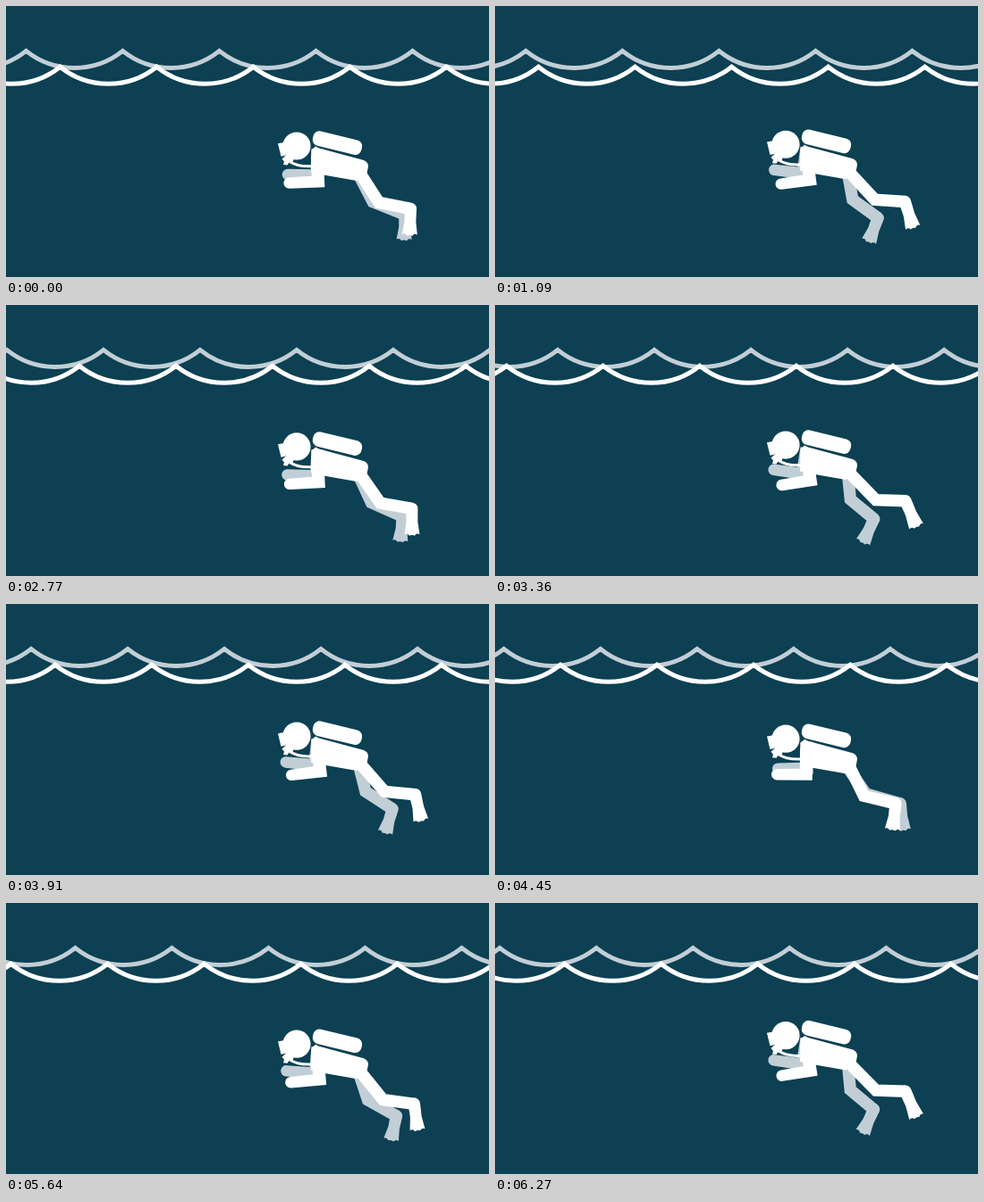
An HTML page that plays this animation: 540x304 px, repeating every 6.31 s.

```html
<!DOCTYPE html>
<html lang="en">
<head>
<meta charset="utf-8">
<title>Scuba diver</title>
<style>
  html, body { margin: 0; width: 100%; height: 100%; overflow: hidden; background: #0c4052; }
  svg { display: block; width: 100vw; height: 100vh; }
  .near { fill: #fff; stroke: #fff; }
  .far { fill: #c2ced6; stroke: #c2ced6; }
  .flat { stroke: none; }
  .line { fill: none; }
  .wave { stroke-width: 5; stroke-miterlimit: 6; }
  .leg { stroke-width: 13.4; }
</style>
</head>
<body>
<svg viewBox="0 0 540 304">
  <path id="waveFar" class="far wave line"/>
  <path id="waveNear" class="near wave line"/>
  <circle id="bubble" class="near line" r="4" stroke-width="2"/>
  <g id="diver">
    <g id="armFar" class="far flat"><path class="arm"/></g>
    <g class="far">
      <path id="legFar" class="leg line"/>
      <path id="footFar" class="flat"/>
    </g>
    <g class="near">
      <path id="legNear" class="leg line"/>
      <path id="footNear" class="flat"/>
    </g>
    <g class="near flat">
      <rect x="342.5" y="135.7" width="56" height="16.8" rx="7" transform="rotate(13.7 370.5 144)"/>
      <path d="M341.5 152L346 148L350 150L400 163.5Q405 165.5 405 170.5L403.5 178L392 186.5L355 180L341 177Z"/>
      <circle cx="325" cy="147.5" r="15.6"/>
      <path d="M304 144.7L310.5 143.5L313 158L307.5 159.2Z"/>
      <path d="M308.5 162L314 157L322 161L320.5 166L316.5 166L314.5 169L310 168.5L311 165Z"/>
    </g>
    <path class="near line" stroke-width="3" d="M317 165Q327 171.5 344 170"/>
    <g id="armNear" class="near flat"><path class="arm"/></g>
  </g>
</svg>
<script>
const LOOP = 6310, STEP = LOOP / 139, SPAN = 108;
const $ = id => document.getElementById(id);
const set = (id, name, value) => $(id).setAttribute(name, value);
const turn = (t, peak, period) => 2 * Math.PI * (t - peak) / period;
const clamp = x => Math.max(0, Math.min(1, x));

const ARM = "M341 158H355V194H315.5A6.25 6.25 0 0 1 315.5 181.5L341 181Z";
document.querySelectorAll(".arm").forEach(p => p.setAttribute("d", ARM));

const wave = y => `M${-3 * SPAN} ${y}` + `a86 86 0 0 0 ${SPAN} 0`.repeat(10);
set("waveFar", "d", wave(50.4));
set("waveNear", "d", wave(68.2));

// Each joint: start, end, bulge halfway
const LEGS = {
  Near: {
    hip: [396.5, 179],
    knee: [[408, 212], [426, 209], [2, 0]],
    ankle: [[443.5, 222], [459, 210], [3, 0.5]],
    tip: [[438.5, 250.5], [471.5, 238.5], [0, 1]]
  },
  Far: {
    hip: [394.5, 180],
    knee: [[418.5, 208], [397, 208.5], [0, 2]],
    ankle: [[459, 216], [423, 230.5], [1, 3]],
    tip: [[465.5, 246.5], [410.5, 256.5], [1, 2]]
  }
};

const joint = ([from, to, bulge], u) =>
  [0, 1].map(i => from[i] + (to[i] - from[i]) * u + bulge[i] * 4 * u * (1 - u));

function drawLeg(side, u) {
  const leg = LEGS[side];
  const knee = joint(leg.knee, u), ankle = joint(leg.ankle, u), tip = joint(leg.tip, u);
  set("leg" + side, "d", `M${leg.hip}L${knee}L${ankle}`);

  const dx = tip[0] - ankle[0], dy = tip[1] - ankle[1], len = Math.hypot(dx, dy);
  const at = (along, across) => [
    ankle[0] + (dx * along - dy * across) / len,
    ankle[1] + (dy * along + dx * across) / len
  ];
  // Rounded heel, flared fin with a scalloped edge
  set("foot" + side, "d",
    `M${at(0, 6.7)}L${at(len * 0.5, 6.3)}L${at(len, 8.5)}` +
    `Q${at(len - 2, 5)} ${at(len + 1.5, 3)}Q${at(len, 0)} ${at(len + 1.5, -3)}` +
    `Q${at(len - 2, -5)} ${at(len, -8.5)}L${at(len * 0.5, -6.5)}L${at(0, -6.7)}` +
    `A6.7 6.7 0 0 0 ${at(0, 6.7)}Z`);
}

function drawBubble(t) {
  const age = t - 1450;
  const shown = age > 0 && age < 700;
  set("bubble", "opacity", shown ? clamp((700 - age) / 200) : 0);
  const x = 308 - 3 * clamp(age / 280);
  const y = 156 - age * 0.102;
  set("bubble", "transform", `translate(${x} ${y}) scale(${clamp(0.3 + age / 300)})`);
}

function draw(t) {
  const drift = 62.7 - 52.8 * Math.cos(turn(t, 449, 4000));
  set("waveFar", "transform", `translate(${drift} 0)`);
  set("waveNear", "transform", `translate(${83 - drift} 0)`);

  const sink = turn(t, 480, 2400);
  const bob = 6.7 + 6 * Math.cos(sink) - 1.2 * Math.cos(2 * sink);
  set("diver", "transform", `translate(0 ${bob})`);

  const kick = 0.5 + 0.5 * Math.cos(turn(t, 772, 2700));
  drawLeg("Near", kick);
  drawLeg("Far", kick);

  const swing = 11.4 * kick - 2.4;
  set("armNear", "transform", `rotate(${-swing} 349 157)`);
  set("armFar", "transform", `translate(0.5 -7) rotate(${swing} 349 157)`);
  drawBubble(t);
}

const start = performance.now();
function frame() {
  const t = (performance.now() - start) % LOOP;
  draw(Math.floor(t / STEP) * STEP);
  requestAnimationFrame(frame);
}
frame();
</script>
</body>
</html>
```
